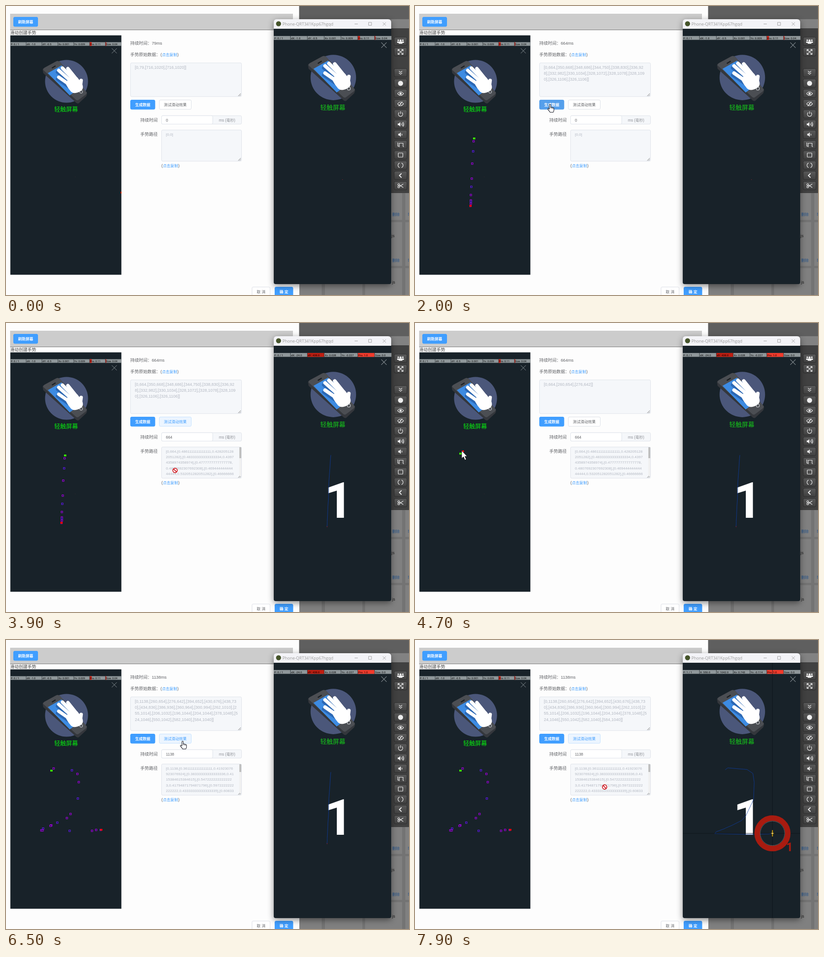
Write an HTML page that moves like this. It is 882 px wide and 635 px high and loops after 8000 ms.

```html
<!DOCTYPE html>
<html lang="zh-CN">
<head>
<meta charset="utf-8">
<title>滑动创建手势</title>
<style>
html, body { margin: 0; width: 100%; height: 100%; overflow: hidden; background: #fdfdfd; }
svg { display: block; font-family: "Liberation Sans", "Noto Sans CJK SC", "Noto Sans CJK", sans-serif; }
text { white-space: pre; }
.bar { font: 5.8px Roboto, sans-serif; }
.digit { font-family: Roboto, sans-serif; font-weight: bold; }
.title { font: 9px "Open Sans", sans-serif; }
.window { filter: drop-shadow(0 4px 7px rgba(0, 0, 0, .45)); }
</style>
</head>
<body>
<svg width="882" height="635" viewBox="0 0 882 635">
  <defs>
    <clipPath id="leftClip"><path d="M9.500 64.500h243v526h-243z"/></clipPath>
    <clipPath id="rightClip"><path d="M586 50h257v557q0 4-4 4h-249q-4 0-4-4z"/></clipPath>
    <clipPath id="pathClip"><path d="M341 273h170v67h-170z"/></clipPath>
    <linearGradient id="key" x2="0" y2="1"><stop stop-color="#5a5a5a"/><stop offset="1" stop-color="#414141"/></linearGradient>
  </defs>
  <g id="still"></g>
  <g id="live"></g>
</svg>
<script>
const LOOP = 8000, STEP = 100;
const BLUE = '#409eff', INK = '#606266', PALE = '#b3b8c2', RED = '#f23a2b';

const strokeA = [[350,668],[348,686],[344,750],[338,830],[336,928],[332,982],
  [330,1034],[328,1072],[328,1078],[328,1090],[326,1106],[326,1106]];
const strokeB = [[260,654],[276,642],[394,652],[430,676],[438,730],[434,836],[386,936],
  [360,964],[300,994],[262,1010],[255,1014],[206,1032],[196,1044],[204,1044],
  [378,1048],[524,1046],[550,1042],[582,1040],[584,1040]];
const tap = [[716,1020],[716,1020]];

// Device pixels to stage pixels
const onLeft = ([x, y]) => [9 + x * .3375, 64 + y * .3372];
const onRight = ([x, y]) => [586 + x * .357, 50 + y * .3597];

const rect = (x, y, w, h, fill, extra = '') =>
  `<rect x="${x}" y="${y}" width="${w}" height="${h}" fill="${fill}" ${extra}/>`;
const text = (x, y, size, fill, str, extra = '') =>
  `<text x="${x}" y="${y}" font-size="${size}" fill="${fill}" ${extra}>${str}</text>`;
const line = (d, color, width = 1, extra = '') =>
  `<path d="${d}" fill="none" stroke="${color}" stroke-width="${width}" ${extra}/>`;
const shape = (d, fill, extra = '') => `<path d="${d}" fill="${fill}" ${extra}/>`;
const circle = (x, y, r, fill, extra = '') => `<circle cx="${x}" cy="${y}" r="${r}" fill="${fill}" ${extra}/>`;
const field = (x, y, w, h, fill, border = '#dfe3ea') => rect(x, y, w, h, fill, `rx="2.5" stroke="${border}"`);
const button = (x, y, w, h, label, fill, border, color, extra = '') =>
  field(x, y, w, h, fill, border) +
  text(x + w / 2, y + 13.2, 8.3, color, label, `text-anchor="middle" ${extra}`);
const primary = (x, y, w, h, label, fill = BLUE) => button(x, y, w, h, label, fill, fill, '#fff', 'font-weight="bold"');

function statusBar(labels, fills) {
  const w = 243 / 7;
  return rect(0, 15, 243, 8, '#8f979a') + labels.map((label, i) => {
    const [part, color] = fills[i] || [0];
    return (part ? rect(i * w, 15, w * part, 8, color) : '') +
      (i ? rect(i * w - .5, 15, .7, 8, '#20282c') : '') +
      `<text class="bar" x="${i * w + 1}" y="21.3">${label}</text>`;
  }).join('');
}
const idleBar = statusBar(
  ['P: 0 / 1', 'dX: -1.0', 'dY: -0.5', 'Xv: 0.001', 'Yv: 0.009', 'Prs: 0.11', 'Size: 0.04'],
  { 5: [.13, '#d3281c'], 6: [.05, '#d3281c'] });

const fingers = 'M106 77L134 102M114 72L140 98M126 73L146 98M106 92L132 110M155 99L153 114';
const palm = 'M126 96Q138 86 147 93L157 106Q162 118 153 123Q140 130 133 124Q126 116 122 108z';
const screenArt = (caption, captionY) =>
  circle(123, 101, 47, '#4b577a') +
  shape('M71 77Q70 73 75 71L100 57Q105 55 109 59L167 125Q169 128 166 134L150 149Q147 151 144 148L72 83z', '#34373c') +
  shape('M72 76Q71 74 75 71L101 57Q105 55 109 59L167 125Q168 127 165 130L149 142Q146 144 143 141z', '#4b4e53') +
  shape('M82 83L112 66 154 114 130 132z', '#3d8be2') +
  line('M91 72L99 67', '#1d2023', 2.5) +
  line(fingers, '#2c68b4', 7, 'stroke-linecap="round" transform="translate(-3 4)"') +
  line(fingers, '#fff', 7.5, 'stroke-linecap="round"') + shape(palm, '#fff') +
  circle(155, 124, 3.2, 'none', 'stroke="#dfe2e6"') +
  text(122, captionY, 13, caption, '轻触屏幕', 'text-anchor="middle"') +
  line('M222 28.5l11 11m0-11l-11 11', '#8b9397');
const RIGHT = 'transform="translate(586 50) scale(1.06)"';

// Side bar: centre height, stroked path, filled path
const icons = [
  [78, '', 'M-5-4.5a1.8 1.8 0 1 0 .01 0M5-4.5a1.8 1.8 0 1 0 .01 0M0-4.5a2.3 2.3 0 1 0 .01 0M-7.5 3v-3h15v3zM-4 5v-4.5h8v4.5z'],
  [101, 'M-5-5L5 5M5-5L-5 5M-5.5-1.5v-4h4M1.5-5.5h4v4M5.5 1.5v4h-4M-1.5 5.5h-4v-4', ''],
  [147, 'M-3.5-4L0-1 3.5-4M-3.5 0L0 3 3.5 0', ''],
  [170, '', 'M0-5.5a5.5 5.5 0 1 0 .01 0'],
  [192.5, 'M-6.5 0Q0-8 6.5 0 0 8-6.5 0', 'M0-2.5a2.5 2.5 0 1 0 .01 0'],
  [215, 'M-6.5 0Q0-8 6.5 0 0 8-6.5 0M-4 5L4-5', 'M0-1.5a1.5 1.5 0 1 0 .01 0'],
  [237.5, 'M-3-3.5a4.8 4.8 0 1 0 6 0M0-6v5.5', ''],
  [260, 'M1.5-2q1.5 2 0 4M3.5-4q3 4 0 8M5.5-5q3.5 5 0 10', 'M-6-2h2.5l3-3v10l-3-3h-2.5z'],
  [282.5, 'M2.5-2q1.5 2 0 4', 'M-5-2h2.5l3-3v10l-3-3h-2.5z'],
  [305, 'M-6-5v8h3M-3 5v-8.5h8.5v7.5M5.5 4h2', ''],
  [327.5, 'M-4-4.5h8q1 0 1 1v7q0 1-1 1h-8q-1 0-1-1v-7q0-1 1-1', ''],
  [350, 'M-2-5a5.3 5.3 0 0 0 0 10M2-5a5.3 5.3 0 0 1 0 10', ''],
  [372.5, 'M2.5-4.5L-2 0 2.5 4.5M1.5-4.5L-3 0 1.5 4.5', ''],
  [395, 'M-2-1.5L6 4M-2 1.5L6-4M-4-4.5a2 2 0 1 0 .01 0M-4 .5a2 2 0 1 0 .01 0', '']];

function backdrop() {
  let out = rect(642, 0, 240, 635, '#737373') + rect(641, 0, 241, 29, '#5f5f5f');
  for (const [x, w] of [[642, 49], [698, 82], [786, 81], [874, 8]])
    for (const [y, h] of [[405, 65], [475, 96], [576, 59]]) out += rect(x, y, w, h, '#808080');
  for (const y of [461, 562])
    out += text(845, y, 8.4, '#285488', '删除') + text(879, y, 8.4, '#285488', '导');
  out += text(841, 508, 9.4, '#222', '.js') + text(845, 610, 9.4, '#222', 'js');
  out += rect(843, 29, 39, 20, '#828282') + rect(843, 49, 39, 362, '#414141');
  for (const [y, stroked, filled] of icons)
    out += rect(849.5, y - 9.5, 28, 18.5, 'url(#key)', 'rx="3" stroke="#2d2d2d"') +
      `<g transform="translate(863.5 ${y})">${line(stroked, '#eee', 1.2)}${shape(filled, '#eee')}</g>`;
  return out;
}

const grip = (x, y) => line(`M${x - 6} ${y}l6-6m-3 6l3-3`, '#666', .8);
const copyLink = (x, y) => text(x, y, 9.4, INK,
  `(<tspan font-size="8.4" fill="${BLUE}">点击复制</tspan>)`);

function dialog() {
  return rect(0, 0, 641.5, 635, '#fdfdfd') + rect(9, 17, 619, 35, '#ccc') + rect(9, 52, 619, 1, '#777') +
    primary(16.5, 24.5, 53, 20.5, '刷新屏幕') + text(9, 62, 9.5, '#444', '滑动创建手势') +
    text(272, 110, 9.4, INK, '手势原始数据：') + copyLink(338, 110) +
    field(272.5, 125, 243, 74, '#f5f7fa') + grip(514, 198) +
    text(294, 254, 9.5, INK, '持续时间') + text(294, 285, 9.5, INK, '手势路径') +
    field(340.5, 241, 175, 18.5, '#f5f7fa') + field(340.5, 241, 112, 18.5, '#fff') +
    text(484, 253.7, 8.4, '#909399', 'ms (毫秒)', 'text-anchor="middle"') +
    field(340.5, 272.5, 175, 68.5, '#f5f7fa') + grip(514, 340) + copyLink(340, 354) +
    button(538.5, 617.5, 39.5, 24, '取 消', '#fff', '#dcdfe6', INK) +
    primary(588.5, 617.5, 39.5, 24, '确 定');
}

function windowFrame() {
  return '<g class="window">' + shape('M586 50v-14q0-7 7-7h243q7 0 7 7v14z', '#f3f3f7') +
    shape('M586 50h257v557q0 4-4 4h-249q-4 0-4-4z', '#182229') + '</g>' +
    circle(596.5, 39, 5.5, '#45542a') +
    '<text class="title" x="605" y="42.6" fill="#999">Phone-QRT341Kpp67hgqd</text>' +
    line('M763 39.5h7M793.5 36h6.5v6.5h-6.5zM824.5 36l7 7m0-7l-7 7', '#999', .9) +
    `<g ${RIGHT}>${screenArt('#16c51b', 168)}</g>`;
}

document.getElementById('still').innerHTML = backdrop() + dialog() +
  rect(9.5, 64.5, 243, 526, '#182229') +
  `<g transform="translate(9.5 64.5)">${screenArt('#08e810', 166.5)}${idleBar}</g>` +
  rect(151, 375, 1, 1, '#3a2a2e') + windowFrame();

// Splits a string into lines of the given lengths; the last length repeats
function wrap(str, lengths) {
  const lines = [];
  for (let i = 0; str; i++) {
    const n = lengths[Math.min(i, lengths.length - 1)];
    lines.push(str.slice(0, n));
    str = str.slice(n);
  }
  return lines;
}
const paragraph = (lines, x, y, size, step) =>
  lines.map((l, i) => text(x, y + i * step, size, PALE, l)).join('');
const record = (duration, points) => JSON.stringify([0, duration, ...points]);

const countAt = (t, start, length, points) =>
  Math.min(points.length, Math.floor((t - start) / length * points.length) + 1);

function drawnAt(t) {
  if (t < 1000) return tap;
  if (t < 4600) return strokeA.slice(0, countAt(t, 1000, 600, strokeA));
  return strokeB.slice(0, countAt(t, 4600, 1000, strokeB));
}

function dots(points) {
  const last = points.length - 1;
  return '<g clip-path="url(#leftClip)">' + points.map((p, i) => {
    const [x, y] = onLeft(p).map(Math.round);
    if (i === last) return rect(x, y, 5, 4, '#f00');
    if (i === 0) return rect(x, y, 5, 4, '#3bff00');
    return rect(x + .5, y + .5, 3.5, 3.5, '#16102c', `stroke="${i % 3 === 2 ? '#6420ff' : '#b005f5'}"`);
  }).join('') + '</g>';
}

function form(t, points) {
  const duration = t < 1700 ? 79 : t < 5600 ? 664 : 1138;
  const lengths = t < 4600 ? [54] : [duration > 999 ? 55 : 54, 56, 55];
  const genHot = t >= 1900 && t < 2450 || t >= 6000 && t < 6300;
  const testHot = t >= 2400 && t < 4600 || t >= 6300;
  let out = text(272, 85, 9.4, INK, `持续时间：${duration}ms`) +
    paragraph(wrap(record(duration, points), lengths), 282, 138, 9, 13.2) +
    primary(272.5, 206.5, 53.5, 20.5, '生成数据', genHot ? '#559feb' : BLUE) +
    (testHot ? button(335.5, 206.5, 70, 20.5, '测试滑动效果', '#ecf5ff', '#c6e2ff', BLUE)
             : button(335.5, 206.5, 70, 20.5, '测试滑动效果', '#fff', '#dcdfe6', INK));
  if (t < 2100)
    return out + text(350, 253.7, 8.4, INK, '0') + text(350, 285, 8.1, PALE, '[0,0]');
  const second = t >= 6100;
  const made = second ? 1138 : 664;
  const ratios = (second ? strokeB : strokeA).map(([x, y]) => [x / 720, y / 1560]);
  const lines = wrap(record(made, ratios), second ? [38, 36, 34, 36] : [38, 36, 35, 35, 36]).slice(0, 6);
  return out + text(350, 253.7, 8.4, INK, made) +
    `<g clip-path="url(#pathClip)">${paragraph(lines, 350, 285, 8.1, 12.2)}</g>` +
    rect(510.5, 273, 4.5, 63, '#f1f1f1') + rect(510.8, 273, 4, second ? 17 : 24, '#bdbdbd');
}

function pointer([x, y]) {
  return line(`M${x} 50V611M586 ${y}H843`, '#0d1418', .8) +
    circle(x, y, 33.5, 'none', 'stroke="#a81b10" stroke-width="12"') +
    circle(x, y, 26.8, 'none', 'stroke="#76807f" stroke-width=".7"') +
    line(`M${x} ${y - 7}v14M${x - 3} ${y}h6`, '#f0b400', 1.6) + circle(x, y, 1, '#fff') +
    `<text class="digit" x="${x + 30}" y="${y + 39}" font-size="26" fill="#a81b10">1</text>`;
}

function touch(t) {
  if (t < 3000) return `<g ${RIGHT}>${idleBar}</g>` + rect(736, 381, 1, 1, '#b8202c');
  const second = t >= 7400;
  const all = second ? strokeB : strokeA;
  const points = all.slice(0, second ? countAt(t, 7400, 580, all) : countAt(t, 3000, 660, all));
  const down = second || t < 3700;
  const [x, y] = points.at(-1), [px, py] = points.at(-2) || [x, y];
  const bar = down
    ? statusBar(['P: 1 / 1', `X: ${x.toFixed(1)}`, `Y: ${y.toFixed(1)}`, `Xv: ${((x - px) / 35).toFixed(3)}`,
        `Yv: ${((y - py) / 35).toFixed(3)}`, 'Prs: 1.0', 'Size: 0.0'], { 5: [1, RED] })
    : statusBar(['P: 0 / 1', 'dX: -24.0', 'dY: 438.0', 'Xv: 0.028', 'Yv: -0.227', 'Prs: 1.0', 'Size: 0.0'],
        { 2: [1, '#c01d10'], 5: [1, RED] });
  const trail = points.map(onRight);
  return `<g ${RIGHT}>${bar}</g><g clip-path="url(#rightClip)">` +
    '<text class="digit" x="696.5" y="428" font-size="110" fill="#fff">1</text>' +
    line('M' + trail.join('L'), '#0b3fae', .75) +
    (down ? pointer(trail.at(-1)) : rect(trail.at(-1)[0], trail.at(-1)[1] - 1, 1, 1.5, '#d01818')) + '</g>';
}

// Cursor stops between the two drawn strokes: time, x, y
const stops = [[200, 831, 31], [500, 480, 130], [800, 70, 268], [1000, 127, 289],
  [1600, 119, 437], [1900, 295, 217], [2200, 295, 217], [2400, 372, 217], [2600, 372, 217],
  [2800, 476, 320], [3700, 476, 320], [3800, 370, 324], [4000, 370, 324], [4500, 97, 285],
  [5600, 206, 415], [5700, 206, 415], [5900, 290, 217], [6100, 300, 217], [6300, 386, 223],
  [6500, 386, 223], [6700, 434, 285], [6900, 415, 323], [LOOP, 415, 323]];

function cursorAt(t, points) {
  if (t >= 1000 && t < 1600 || t >= 4600 && t <= 5600) return onLeft(points.at(-1));
  const i = stops.findIndex(s => s[0] > t);
  const [t0, x0, y0] = stops[i - 1], [t1, x1, y1] = stops[i];
  const k = (t - t0) / (t1 - t0), e = k * k * (3 - 2 * k);
  return [x0 + (x1 - x0) * e, y0 + (y1 - y0) * e];
}

function cursor(x, y) {
  const inside = (l, t, r, b) => x >= l && x <= r && y >= t && y <= b;
  const at = `transform="translate(${x} ${y})"`;
  if (inside(272, 125, 515, 199) || inside(340, 272, 515, 341))
    return `<g ${at}>${circle(0, 0, 4.8, '#fff', 'stroke="#cc0a12" stroke-width="1.7"')}${line('M-3.4-3.4l6.8 6.8', '#cc0a12', 1.7)}</g>`;
  if (inside(272, 206, 327, 228) || inside(335, 206, 406, 228))
    return shape('M-1 1q0-1.7 1.5-1.7T2 1v4.5q1.5-.8 2.5.5 1.5-.6 2.3.7Q9 6.5 9 8.5V12q0 2-1.5 4.5H.5Q-1 13.5-4 10.5q-1-1.5.5-2.2Q-2 8-1 10z',
      '#fff', `stroke="#181a25" stroke-width="1.1" ${at}`) + line('M2 5.5v3M4.5 6.3v2.5M6.8 7v2', '#181a25', .7, at);
  return shape('M0 0v17l4-3.5 3 7 3-1.3-3-6.7h5z', '#fff', `stroke="#111" stroke-width=".8" ${at}`);
}

const live = document.getElementById('live');
let shown = -1;
function tick(now) {
  const t = Math.floor(now % LOOP / STEP) * STEP;
  if (t !== shown) {
    shown = t;
    const points = drawnAt(t);
    live.innerHTML = form(t, points) + dots(points) + touch(t) +
      (t < 200 ? '' : cursor(...cursorAt(t, points)));
  }
  requestAnimationFrame(tick);
}
tick(0);
</script>
</body>
</html>
```
